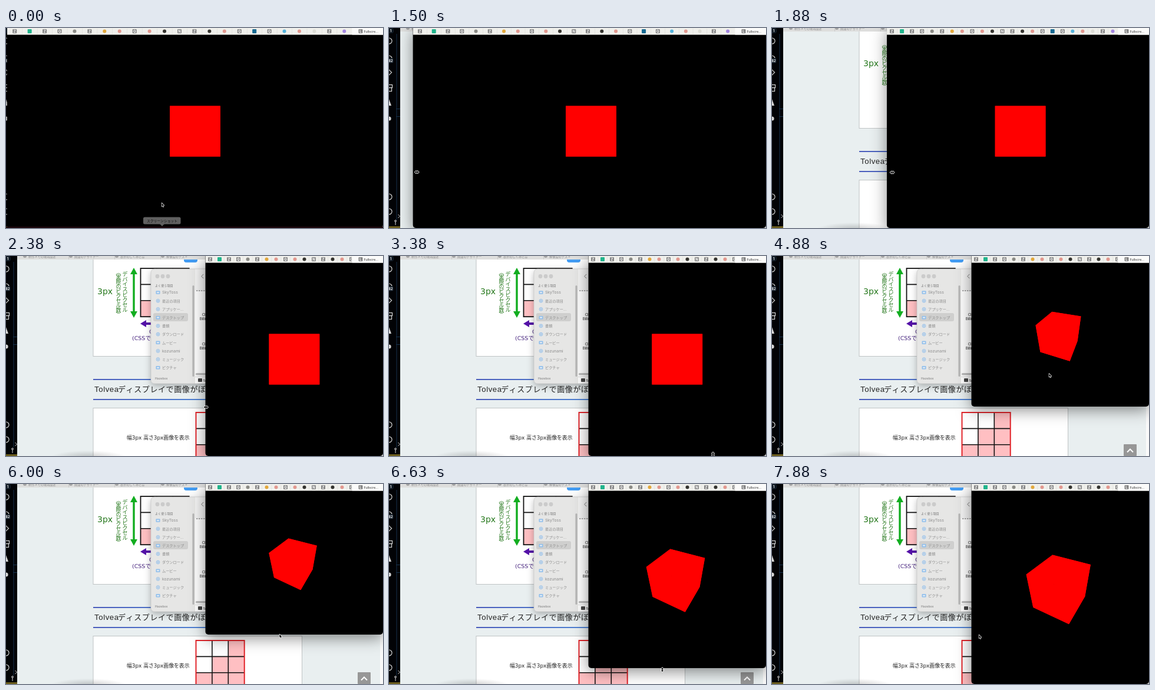
An HTML page with a canvas for the animation above (8 s loop, 640 px wide and 340 px high).

```html
<!DOCTYPE html>
<html lang="ja">
<head>
<meta charset="utf-8">
<title>Window resize</title>
<style>
html, body { margin: 0; width: 100%; height: 100%; overflow: hidden; background: #000; }
canvas { display: block; width: 640px; height: 340px; }
</style>
</head>
<body>
<canvas id="stage" width="640" height="340"></canvas>
<script>
const ctx = document.getElementById('stage').getContext('2d');
const LOOP = 8000, STEP = 125, LAG = 18, TOP = 11, RIGHT = 640;
const CJK = '"Noto Sans CJK JP", "Noto Sans CJK", sans-serif';
const WIDE = '"DejaVu Sans", ' + CJK;
const PLAIN = '"Liberation Sans", ' + CJK;
const UI = 'Inter, ' + CJK;

// Eased 0..1 between two times
function ramp(t, from, to) {
  const k = Math.min(1, Math.max(0, (t - from) / (to - from)));
  return k * k * (3 - 2 * k);
}
const edgeLeft = t => 2 + 336.5 * ramp(t, 1266, 2375);
const edgeBottom = t => 340 - 84 * (ramp(t, 3500, 4120) - ramp(t, 6125, 6929));
const azimuth = t => 29.1 * ramp(t, 4600, 5014);
const elevation = t => 40.3 * ramp(t, 4600, 4950);

// Resting points of the pointer: time, x, y
const stops = [
  [125, 264, 297], [875, 2, 245], [1800, 2, 245], [2400, 340, 257], [2900, 340, 257],
  [3375, 550, 337], [4300, 550, 256], [4625, 484, 178], [5000, 465, 207],
  [6000, 464, 255], [7250, 464, 337], [7875, 351, 256]
];
function pointerAt(t) {
  let [, x, y] = stops[0];
  for (let i = 1; i < stops.length; i++) {
    const [from, x0, y0] = stops[i - 1], [to, x1, y1] = stops[i];
    const k = ramp(t, from, to);
    x += (x1 - x0) * k;
    y += (y1 - y0) * k;
  }
  return [x, y];
}

function rect(x, y, w, h, color) {
  ctx.fillStyle = color;
  ctx.fillRect(x, y, w, h);
}
function round(x, y, w, h, r, color) {
  ctx.beginPath();
  ctx.roundRect(x, y, w, h, r);
  ctx.fillStyle = color;
  ctx.fill();
}
function dot(x, y, r, color) {
  ctx.beginPath();
  ctx.arc(x, y, r, 0, Math.PI * 2);
  ctx.fillStyle = color;
  ctx.fill();
}
function ring(x, y, r, color, width = 1) {
  ctx.beginPath();
  ctx.arc(x, y, r, 0, Math.PI * 2);
  ctx.strokeStyle = color;
  ctx.lineWidth = width;
  ctx.stroke();
}
function poly(points, color) {
  ctx.beginPath();
  points.forEach(([x, y]) => ctx.lineTo(x, y));
  ctx.closePath();
  ctx.fillStyle = color;
  ctx.fill();
}
function line(points, color, width = 1) {
  ctx.beginPath();
  points.forEach(([x, y]) => ctx.lineTo(x, y));
  ctx.strokeStyle = color;
  ctx.lineWidth = width;
  ctx.stroke();
}
function text(str, x, y, font, color, align = 'left') {
  ctx.font = font;
  ctx.fillStyle = color;
  ctx.textAlign = align;
  ctx.fillText(str, x, y);
}
function column(str, x, y, step, size, color) {
  [...str].forEach((c, i) => text(c, x, y + i * step, `${size}px ${CJK}`, color, 'center'));
}
function shadow(blur, alpha, y) {
  ctx.shadowColor = `rgba(0,0,0,${alpha})`;
  ctx.shadowBlur = blur;
  ctx.shadowOffsetY = y;
}

// Chevron around x, y; dx and dy give the direction of its tip
function chevron(x, y, size, dx, dy, color, width) {
  const tip = [x + dx * size / 2, y + dy * size / 2];
  const tail = s => [x - dx * size / 2 + s * dy * size, y - dy * size / 2 + s * dx * size];
  line([tail(-1), tip, tail(1)], color, width);
}

function drawEditor() {
  const ink = '#d8d8d8', rule = '#17324c';
  rect(0, 0, 20, 340, '#020306');
  rect(12.5, 10, 1, 316, rule);
  rect(12, 137, 7, 1, rule);
  rect(12, 150, 7, 1, rule);
  for (const y of [22, 52, 287, 312]) ring(0, y, 5, ink, 1.2);
  chevron(2, 75.5, 5, 1, 0, ink, 1.2);
  ctx.strokeRect(-1.5, 96.5, 7, 5);
  ctx.strokeRect(-1.5, 101.5, 6, 6);
  poly([[0, 121], [4, 132], [-4, 132]], ink);
  dot(0, 154, 3.6, ink);
  for (const [n, y] of [['1', 5], ['62', 56]]) {
    round(-2, y - 5, 10, 9, 4, '#101a24');
    text(n, 3, y + 2, `bold 5.5px ${UI}`, '#fff', 'center');
  }
  chevron(17, 320, 3, 1, 0, ink);
  ring(11, 328, 1.4, ink);
  rect(10.5, 329, 1, 6, ink);
  rect(0, 337, 20, 3, '#6b5c1c');
}

function drawGrid(x, y, edge, edgeWidth) {
  const n = 27.4, size = n * 3;
  rect(x, y, size, size, '#fff');
  for (let r = 0; r < 3; r++)
    rect(x + (2 - r) * n, y + r * n, (r + 1) * n, n, '#ffbfc2');
  for (let i = 1; i < 3; i++) {
    line([[x + i * n, y], [x + i * n, y + size]], '#111', 1.6);
    line([[x, y + i * n], [x + size, y + i * n]], '#111', 1.6);
  }
  ctx.strokeStyle = edge;
  ctx.lineWidth = edgeWidth;
  ctx.strokeRect(x, y, size, size);
}

function drawHeading() {
  const blue = ctx.createLinearGradient(148, 0, 503, 0);
  blue.addColorStop(0, '#3a4db6');
  blue.addColorStop(1, '#3f9be6');
  rect(148, 209, 355, 1.8, blue);
  rect(148, 243, 355, 1.8, blue);
  ctx.letterSpacing = '0.6px';
  text('Tolvea', 150, 231.4, `13.2px ${PLAIN}`, '#222');
  text('ディスプレイで画像がぼやける', 190, 231.4, `13px ${CJK}`, '#222');
  ctx.letterSpacing = '0px';
}

function drawPage() {
  rect(19, 0, 621, 340, '#e9eff0');
  rect(635, 0, 5, 340, '#fafafa');
  ctx.lineWidth = 1;
  ctx.strokeStyle = '#bfc3c4';
  for (const [y, h] of [[-6, 176.5], [258.5, 100]]) {
    rect(148, y, 355, h, '#fff');
    ctx.strokeRect(148, y, 354.5, h);
  }

  const leaf = '#25781c', green = '#12ad20', violet = '#5410a8';
  text('3px', 155, 65.3, `14px ${WIDE}`, leaf);
  column('︵実際のピクセル数︶', 191, 31, 8, 8.8, leaf);
  column('デバイスピクセル', 202, 34, 8.7, 9, leaf);
  rect(215.3, 28, 3.4, 69, green);
  poly([[217, 20], [223, 31], [211, 31]], green);
  poly([[217, 105], [223, 94], [211, 94]], green);
  drawGrid(228.5, 21, '#111', 1.8);
  round(302, -5, 23, 16, 4, '#439cf3');
  rect(234, 113, 60, 4, violet);
  poly([[228, 115], [238, 109], [238, 121]], violet);
  text('CSSピクセル', 243, 132, `9.5px ${WIDE}`, '#43207c');
  text('(CSSで表示', 214, 142.5, `9.5px ${WIDE}`, '#43207c');

  drawHeading();
  text('幅3px 高さ3px画像を表示', 205, 311.6, `8.85px ${WIDE}`, '#222');
  drawGrid(322.5, 266, '#e01a20', 1.9);

  rect(19, 0, 621, 6, '#dededd');
  ['制作メモの環境設定', '画面のデザイナー', '表示のしくみとは', '解像度のテスト'].forEach((s, i) => {
    const x = 32 + i * 78;
    dot(x, 0, 3, '#a2a2a2');
    text(s, x + 6, 3, `5.2px ${UI}`, '#8a8a8a');
    rect(x + 74, 0, 1, 6, '#cacaca');
  });
  round(597, 320, 22, 20, 1, '#979797');
  chevron(608, 331, 5, 0, -1, '#fff', 2);

  ctx.save();
  ctx.translate(140, 342);
  ctx.scale(1, 0.18);
  const g = ctx.createRadialGradient(0, 0, 15, 0, 0, 64);
  g.addColorStop(0, 'rgba(0,0,0,.15)');
  g.addColorStop(1, 'rgba(0,0,0,0)');
  dot(0, 0, 64, g);
  ctx.restore();
}

function drawFiles() {
  ctx.save();
  shadow(12, 0.28, 4);
  round(246, 22, 180, 195, 6, '#fff');
  ctx.restore();
  rect(320, 22.5, 100, 36, '#f3f3f3');
  round(246, 22, 75, 195, [6, 0, 0, 6], '#e6e6e5');
  ctx.strokeStyle = '#c4c4c4';
  ctx.lineWidth = 0.7;
  ctx.beginPath();
  ctx.roundRect(246, 22, 180, 195, 6);
  ctx.stroke();
  round(316.5, 50, 3, 155, 1.5, '#b4b4b4');
  for (let i = 0; i < 3; i++) dot(257 + i * 9, 34.5, 3.4, '#cbcbcb');
  round(250, 97, 59, 14, 3, '#cfcfce');
  text('よく使う項目', 253, 52.3, `bold 5.1px ${CJK}`, '#989898');

  const items = ['SkyToss', '最近の項目', 'アプリケー…', 'デスクトップ', '書類', 'ダウンロード',
    'ムービー', 'kozunami', 'ミュージック', 'ピクチャ'];
  const blue = '#8dbdec';
  items.forEach((s, i) => {
    const y = 62 + i * 14.2;
    text(s, 265, y + 2.4, `${s < 'z' ? 6.8 : 6.2}px ${UI}`, '#8c8c8c');
    if (i % 3) {
      ring(258, y, 2.8, blue);
      dot(258, y, 1.2, blue);
    } else {
      round(254.5, y - 2.7, 7, 5.5, 1, blue);
      rect(256, y - 1.2, 4, 2.5, '#dbe7f2');
    }
  });
  text('Hazebox', 253, 209.5, `bold 5px ${UI}`, '#989898');

  chevron(333.5, 34.5, 3.5, -1, 0, '#777');
  for (let x = 323; x < 340; x += 4) rect(x, 58.5, 2.5, 1, '#555');
  for (const y of [102, 152]) {
    text('Cloth', 333, y, `5.6px ${UI}`, '#111');
    text('Billing', 329, y + 7, `5.6px ${UI}`, '#111');
  }
  round(322, 199, 50, 3.5, 1.5, '#bcbcbc');
  rect(321, 205, 100, 0.7, '#ccc');
  round(326, 208, 7, 6, 1, '#444');
  text('Main', 335, 213.5, `6px ${UI}`, '#333');
}

// Capitals are letter tiles, small letters pick a colour
const tabs = 'ZgZQoZyrQrdNZdrQtQbrfZp';
const tabColors = { g: '#21b48c', o: '#8b8b86', y: '#e2a83c', r: '#e2988f', d: '#35342f',
  t: '#176a92', b: '#55b3dc', f: '#dcdcd5', p: '#a487e0' };

function letterTile(c, x) {
  round(x - 3.5, 2, 7, 7, 1.2, '#858585');
  text(c, x, 7.8, `bold 5.8px ${UI}`, '#fff', 'center');
}

function drawTabs(left) {
  rect(left, 0, RIGHT - left, 11.5, '#f0f0ec');
  const gap = Math.max(16, (587 - left) / tabs.length);
  ctx.save();
  ctx.beginPath();
  ctx.rect(left, 0, 587 - left, 12);
  ctx.clip();
  [...tabs].forEach((c, i) => {
    const x = left + gap * (i + 0.5);
    rect(x + gap / 2, 1, 0.6, 9.5, '#deded9');
    if (c < 'a') letterTile(c, x);
    else if ('gt'.includes(c)) round(x - 3.5, 2, 7, 7, 1, tabColors[c]);
    else dot(x, 5.5, 3, tabColors[c]);
  });
  ctx.restore();
  rect(587.5, 0, 53, 11.5, '#fbfbfa');
  letterTile('L', 602);
  text('Fullscre…', 607.5, 7.7, `5.4px ${UI}`, '#333');
}

function drawCube(cx, cy, height, az, el) {
  const rad = Math.PI / 180;
  const focal = height / 2 / Math.tan(37.5 * rad);
  const ca = Math.cos(az * rad), sa = Math.sin(az * rad);
  const ce = Math.cos(el * rad), se = Math.sin(el * rad);
  const project = ([x, y, z]) => {
    const u = x * ca - z * sa, w = x * sa + z * ca;
    const k = focal / (3 - y * se - w * ce);
    return [cx + u * k, cy - (y * ce - w * se) * k];
  };
  for (let axis = 0; axis < 3; axis++) {
    for (const side of [-0.5, 0.5]) {
      const face = [[-0.5, -0.5], [0.5, -0.5], [0.5, 0.5], [-0.5, 0.5]].map(([a, b]) => {
        const p = [];
        p[axis] = side;
        p[(axis + 1) % 3] = a;
        p[(axis + 2) % 3] = b;
        return project(p);
      });
      poly(face, '#f00');
    }
  }
}

function drawWindow(t) {
  const left = edgeLeft(t), bottom = edgeBottom(t);
  // The canvas inside the window follows the frame slightly late
  const width = RIGHT - edgeLeft(t - LAG);
  const height = edgeBottom(t - LAG) - TOP;
  const corners = [0, 0, 5, 5];
  ctx.save();
  shadow(26, 0.45, 6);
  round(left, 0, RIGHT - left, bottom, corners, '#000');
  ctx.restore();
  ctx.save();
  ctx.beginPath();
  ctx.roundRect(left, 0, RIGHT - left, bottom, corners);
  ctx.clip();
  drawTabs(left);
  drawCube(left + width / 2, TOP + height / 2, height, azimuth(t), elevation(t));
  ctx.restore();
}

function drawTooltip() {
  round(233, 321.5, 63.5, 12, 2.5, '#606060');
  poly([[261, 333], [269, 333], [265, 337]], '#606060');
  text('スクリーンショット', 265, 329.8, `5.8px ${CJK}`, '#0c0c0c', 'center');
  rect(0, 337.5, 640, 2.5, '#1c070c');
}

function outlined(points) {
  ctx.lineJoin = 'round';
  line([...points, points[0], points[1]], '#fff', 1.5);
  poly(points, '#000');
  ctx.lineJoin = 'miter';
}

function drawPointer(t) {
  let [x, y] = pointerAt(t);
  const across = t >= 1000 && t < 2900;
  const upright = (t >= 3375 && t < 4300) || (t >= 6060 && t < 7200);
  if (across) x = edgeLeft(t + LAG) + 1;
  if (upright) y = Math.min(337, edgeBottom(t + LAG));
  ctx.save();
  ctx.translate(x, y);
  if (across || upright) {
    if (upright) ctx.rotate(Math.PI / 2);
    for (const s of [-1, 1]) outlined([[s * 3.6, 0], [s * 1.2, -2.2], [s * 1.2, 2.2]]);
    line([[-2, 0], [2, 0]], '#000', 1.2);
  } else {
    ctx.scale(0.9, 0.9);
    outlined([[0.5, 0.5], [0.5, 6.8], [1.9, 5.5], [2.9, 7.9], [3.9, 7.4], [2.9, 5.2], [4.7, 5]]);
  }
  ctx.restore();
}

function frame(now) {
  const t = Math.floor((now % LOOP) / STEP) * STEP;
  drawEditor();
  drawPage();
  drawFiles();
  drawWindow(t);
  if (t < 250) drawTooltip();
  drawPointer(t);
  requestAnimationFrame(frame);
}
requestAnimationFrame(frame);
</script>
</body>
</html>
```
